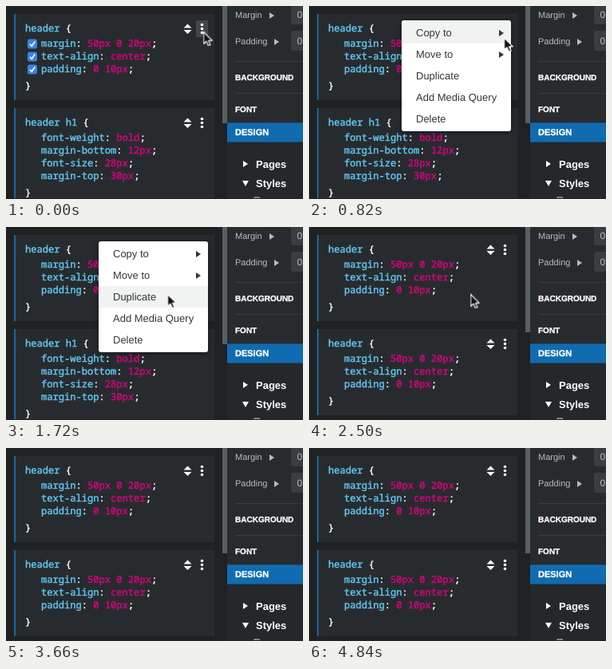
These frames come from a looping animation (372x242 px, 4.86 s). An HTML page:

```html
<!DOCTYPE html>
<html lang="en">
<head>
<meta charset="utf-8">
<title>Style rule menu</title>
<style>
html, body { margin: 0; width: 100%; height: 100%; overflow: hidden; background: #202123; }
svg { display: block; width: 372px; height: 242px; font-family: "Liberation Sans", Arial, sans-serif; text-rendering: geometricPrecision; }
.code { font: 500 12.1px "Noto Sans Mono", "Liberation Mono", monospace; fill: #fff; stroke: #fff; stroke-width: .4px; white-space: pre; }
.key { fill: #62caf7; stroke: #62caf7; }
.val { fill: #d6057f; stroke: #d6057f; }
.field { font-size: 11px; fill: #b9bcbe; }
.field .num { font-size: 12px; }
.head { font-size: 10px; font-weight: bold; fill: #fff; }
.head text { stroke: #fff; stroke-width: .3px; }
.head .tab { font-size: 11px; }
.tree { font-size: 13px; font-weight: bold; fill: #fff; }
.menu text { font-size: 13px; fill: #353638; }
.menu .panel { filter: drop-shadow(0 1px 3px #0008); }

.before, .after, .hot, .checks, .menu, .row, .cursor {
  animation: 4860ms step-end infinite;
}
.before { animation-name: before; }
.after { animation-name: after; }
.hot { animation-name: hot; }
.checks { animation-name: checks; }
.menu { animation-name: menu; }
.row { animation-name: row; }
.cursor { animation-name: move; animation-timing-function: ease-in-out; }

@keyframes before { 0% { visibility: visible; } 47.33%, 100% { visibility: hidden; } }
@keyframes after { 0% { visibility: hidden; } 47.33%, 100% { visibility: visible; } }
@keyframes hot { 0% { visibility: visible; } 6.17%, 100% { visibility: hidden; } }
@keyframes checks {
  0% { visibility: visible; }
  6.17% { visibility: hidden; }
  57.4% { visibility: visible; }
  60.6%, 100% { visibility: hidden; }
}
@keyframes menu {
  0% { visibility: hidden; }
  6.17% { visibility: visible; }
  47.33%, 100% { visibility: hidden; }
}
@keyframes row {
  0% { transform: translateY(0); }
  20.8% { transform: translateY(27px); }
  30%, 100% { transform: translateY(54px); }
}
@keyframes move {
  0%, 12.3% { transform: translate(247.5px, 32.5px); }
  14.8%, 19.3% { transform: translate(244.5px, 40px); }
  24%, 27.8% { transform: translate(220.5px, 67px); }
  32.9%, 57% { transform: translate(202.5px, 84.5px); }
  65.8%, 100% { transform: translate(376px, 113px); }
}
</style>
</head>
<body>
<svg viewBox="0 0 372 242">
  <defs>
    <g id="tools" fill="#fff">
      <path d="M222.5 27.5 227.5 22.5 232.5 27.5ZM222.5 30 227.5 35 232.5 30Z"/>
      <circle cx="245.5" cy="23.5" r="1.8"/>
      <circle cx="245.5" cy="28.5" r="1.8"/>
      <circle cx="245.5" cy="33.5" r="1.8"/>
    </g>
    <g id="box">
      <rect x="10" y="10" width="251" height="108" fill="#282b2e"/>
      <rect x="10" y="10" width="2" height="108" fill="#126aa8"/>
    </g>
    <g id="rule" class="code">
      <text x="24" y="32"><tspan class="key">header</tspan> {</text>
      <text x="44" y="51"><tspan class="key">margin</tspan>: <tspan class="val">50px 0 20px</tspan>;</text>
      <text x="44" y="67"><tspan class="key">text-align</tspan>: <tspan class="val">center</tspan>;</text>
      <text x="44" y="83"><tspan class="key">padding</tspan>: <tspan class="val">0 10px</tspan>;</text>
      <text x="24" y="104">}</text>
    </g>
    <g id="check">
      <rect x="27" y="41.5" width="12" height="12" rx="2.5" fill="#3584ee"/>
      <path d="M30 47.8 32.2 50.3 36.2 44.5" fill="none" stroke="#fff" stroke-width="1.7"/>
    </g>
    <path id="arrow" d="M0 0 6 4 0 8Z"/>
  </defs>

  <rect width="372" height="242" fill="#202123"/>

  <use href="#box"/>
  <rect class="hot" x="238" y="18" width="15" height="21" fill="#44474a"/>
  <use href="#rule"/>
  <use href="#tools"/>
  <g class="checks">
    <use href="#check"/>
    <use href="#check" y="16"/>
    <use href="#check" y="32"/>
  </g>

  <use href="#box" y="118"/>
  <g class="before">
    <rect x="10" y="230" width="251" height="12" fill="#282b2e"/>
    <rect x="10" y="230" width="2" height="12" fill="#126aa8"/>
    <g class="code">
      <text x="24" y="150"><tspan class="key">header h1</tspan> {</text>
      <text x="44" y="169"><tspan class="key">font-weight</tspan>: <tspan class="val">bold</tspan>;</text>
      <text x="44" y="185"><tspan class="key">margin-bottom</tspan>: <tspan class="val">12px</tspan>;</text>
      <text x="44" y="201"><tspan class="key">font-size</tspan>: <tspan class="val">28px</tspan>;</text>
      <text x="44" y="217"><tspan class="key">margin-top</tspan>: <tspan class="val">30px</tspan>;</text>
      <text x="24" y="238">}</text>
    </g>
  </g>
  <use class="after" href="#rule" y="118"/>
  <use href="#tools" y="118"/>

  <g fill="#566064">
    <rect x="271" width="6" height="132"/>
    <rect class="before" x="271" y="132" width="6" height="15"/>
  </g>
  <rect x="277" width="95" height="147" fill="#282b2e"/>
  <rect x="277" y="170" width="95" height="72" fill="#25282a"/>
  <g fill="#3b3e41">
    <rect x="357" y="-4" width="20" height="27" rx="3"/>
    <rect x="357" y="31" width="20" height="25" rx="3"/>
    <rect x="287" y="69" width="85" height="1"/>
    <rect x="287" y="109" width="85" height="1"/>
  </g>
  <g class="field">
    <text x="287" y="15">Margin</text>
    <text x="287" y="48">Padding</text>
    <text class="num" x="364.5" y="15">0</text>
    <text class="num" x="364.5" y="48">0</text>
    <use href="#arrow" x="330" y="8"/>
    <use href="#arrow" x="336" y="41"/>
  </g>
  <g class="head">
    <text x="287" y="93">BACKGROUND</text>
    <text x="287" y="133">FONT</text>
    <rect x="277" y="146.4" width="95" height="24.2" fill="#106bb1"/>
    <text class="tab" x="287" y="162">DESIGN</text>
  </g>
  <g class="tree">
    <use href="#arrow" x="297" y="194"/>
    <text x="313" y="203">Pages</text>
    <path d="M296 219H304L300 226Z"/>
    <text x="313" y="227">Styles</text>
    <path d="M311 243V240H317L320 243" fill="none" stroke="#d5d7d8"/>
  </g>
  <rect y="241" width="372" height="1" fill="#291f24"/>

  <g class="menu">
    <rect class="panel" x="116" y="18" width="137" height="139" rx="3" fill="#fff"/>
    <rect class="row" x="116" y="20" width="137" height="27" fill="#f1f3f3"/>
    <text x="134" y="38">Copy to</text>
    <text x="134" y="65">Move to</text>
    <text x="134" y="92">Duplicate</text>
    <text x="134" y="119">Add Media Query</text>
    <text x="134" y="146">Delete</text>
    <use href="#arrow" x="238" y="30" fill="#353638"/>
    <use href="#arrow" x="238" y="57" fill="#353638"/>
  </g>

  <path class="cursor" d="M0 0V15L3.5 11.8 5.9 17.3 8.5 16.2 6.1 10.8H10.8Z" fill="#111" stroke="#fff" stroke-width="1.2" stroke-linejoin="round"/>
</svg>
</body>
</html>
```
